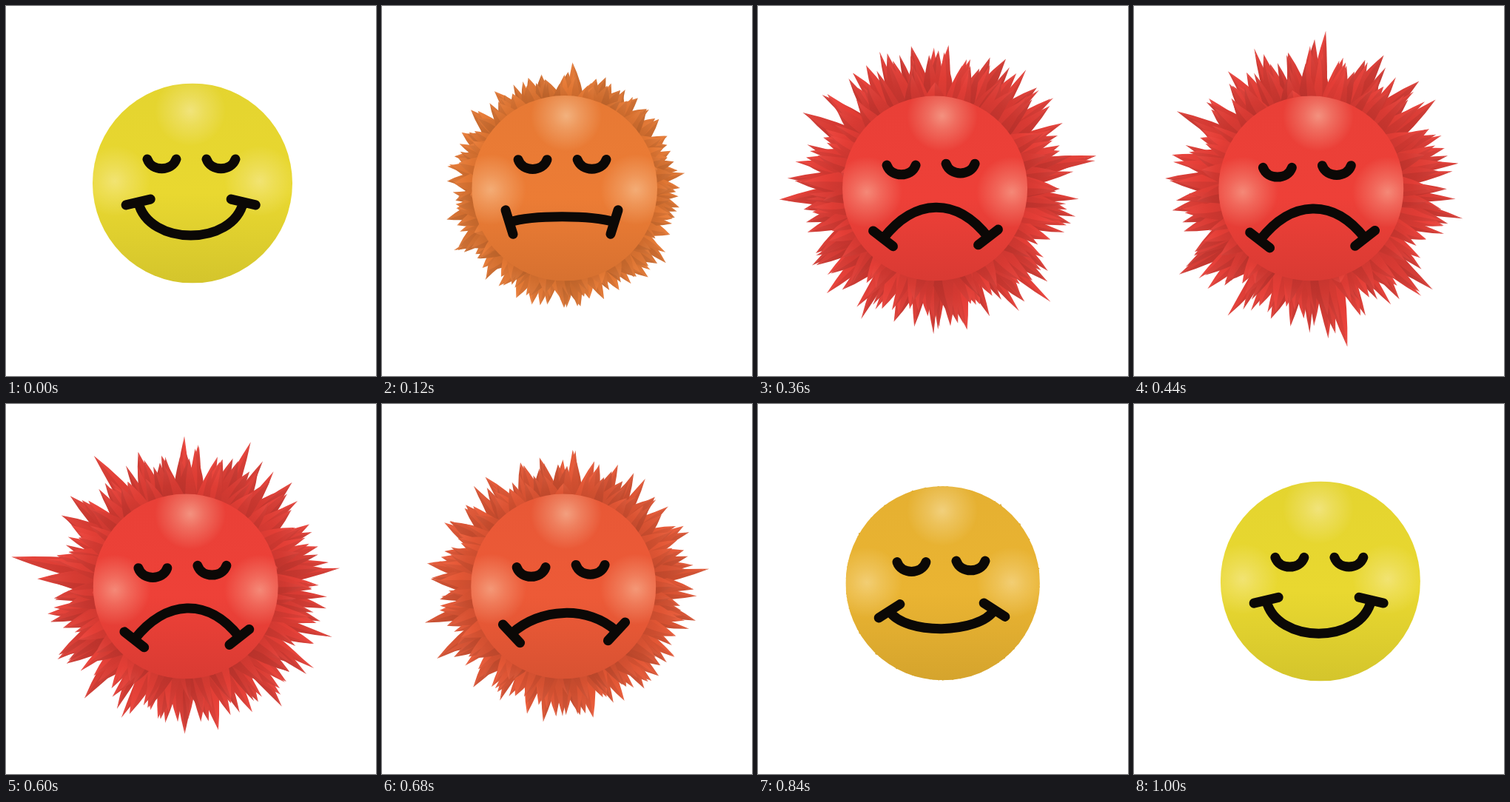
Recreate the animation shown at these times as an HTML page with a canvas. Size 500x500 px, loop 1.04 s.

```html
<!DOCTYPE html>
<html lang="en">
<head>
<meta charset="utf-8">
<title>Mood ball</title>
<style>
html, body { margin: 0; height: 100%; overflow: hidden; background: #fff; }
canvas { display: block; width: 100%; height: 100%; }
</style>
</head>
<body>
<canvas id="stage" width="500" height="500"></canvas>
<script>
const ctx = document.getElementById('stage').getContext('2d');
const LOOP = 1040, STEP = 40, TAU = Math.PI * 2;
const YELLOW = [233, 216, 48], RED = [238, 64, 56];

// The longest outbursts: direction, time of the peak, length
const FLARES = [
  [-1.76, 240, 105], [-.2, 340, 100], [1.27, 240, 90],
  [3.07, 340, 88], [3.31, 600, 115], [-1.57, 520, 84]
];

const lerp = (a, b, u) => a + (b - a) * u;
const clamp = u => Math.max(0, Math.min(1, u));
const smooth = (from, to, t) => {
  const u = clamp((t - from) / (to - from));
  return u * u * (3 - 2 * u);
};
const rnd = n => { const v = Math.sin(n * 12.9898) * 43758.5453; return v - Math.floor(v); };
const tint = (c, k, white = 0) =>
  `rgb(${c.map(v => Math.round(lerp(Math.min(255, v * k), 255, white))).join()})`;

// Everything follows from the mood (0 calm, 1 furious) and a slow sway of the head.
function poseAt(t) {
  const mood = smooth(0, 210, t) * (1 - smooth(580, 960, t));
  const sway = power => Math.sin(Math.PI * (t / LOOP) ** power) ** 2;
  const shrink = Math.min(1, mood * 1.6);
  return {
    t, mood,
    color: YELLOW.map((v, i) => lerp(v, RED[i], mood)),
    x: 252 - 13 * sway(.7),
    y: 239.5 + 7 * shrink,
    r: 135 - 10 * shrink,
    grow: Math.max(0, (mood - .2) / .8),
    eyeX: 250.5 - 17 * sway(.7),
    eyeY: 207 + 13 * sway(1.25),
    mouthX: 249.7 - 10 * sway(.55),
    mouthY: 265 + 44 * mood + 8 * sway(1.25),
    tilt: -1.7 * sway(1.25)
  };
}

// A cone in two facets, one lit and one in shade.
function spike({ angle, reach, width, shade, bend }, { x, y, r, color }) {
  const cos = Math.cos(angle), sin = Math.sin(angle), base = r * .9;
  const at = (d, side) => [x + cos * d - sin * side, y + sin * d + cos * side];
  const knee = lerp(base, reach, .55);
  const tip = at(reach, bend), root = at(base, 0);
  for (const side of [-1, 1]) {
    const k = shade + (cos * side < 0 ? .03 : -.04);
    const fill = ctx.createLinearGradient(...root, ...tip);
    fill.addColorStop(0, tint(color, k * .9));
    fill.addColorStop(.5, tint(color, k * .96));
    fill.addColorStop(1, tint(color, k, .05));
    ctx.fillStyle = fill;
    ctx.beginPath();
    ctx.moveTo(...at(base, side * width));
    ctx.quadraticCurveTo(...at(knee, side * width * .7 + bend * .3), ...tip);
    ctx.quadraticCurveTo(...at(knee, -side), ...root);
    ctx.fill();
  }
}

function drawSpikes(pose) {
  const { t, r, grow } = pose;
  if (!grow) return;
  const wave = (seed, turns) => .5 + .5 * Math.sin(TAU * (rnd(seed) + turns * t / LOOP));
  const list = FLARES.map(([angle, peak, length]) => ({
    angle, width: 17, shade: .94, bend: 0,
    reach: r + grow * length * Math.exp(-(((t - peak) / 130) ** 2))
  }));
  const count = 170;
  for (let i = 0; i < count; i++) {
    // Spikes leaning towards the viewer look shorter and lie in front.
    const lean = rnd(i + 600) ** 1.5 * .55;
    const length = 34 + 24 * rnd(i + 300) + 18 * wave(i + 9, 1) + 24 * wave(i + 50, 2) ** 6;
    list.push({
      angle: TAU * (i + 2 * rnd(i)) / count,
      reach: lerp(r - 3, (r + length) * Math.cos(lean), grow),
      width: 9 + 8 * rnd(i + 70),
      shade: .87 + .1 * rnd(i + 500),
      bend: 22 * (rnd(i + 40) - .5)
    });
  }
  for (const s of list.sort((a, b) => b.reach - a.reach)) spike(s, pose);
}

function glow(x, y, r, alpha) {
  const g = ctx.createRadialGradient(x, y, 0, x, y, r);
  g.addColorStop(0, `rgba(255,245,215,${alpha})`);
  g.addColorStop(.4, `rgba(255,245,215,${alpha * .55})`);
  g.addColorStop(1, 'rgba(255,245,215,0)');
  ctx.fillStyle = g;
  ctx.fillRect(x - r, y - r, 2 * r, 2 * r);
}

function drawBall({ x, y, r, color, mood }) {
  const skin = ctx.createLinearGradient(0, y - r, 0, y + r);
  skin.addColorStop(0, tint(color, .98));
  skin.addColorStop(.55, tint(color, 1));
  skin.addColorStop(1, tint(color, .91));
  ctx.save();
  ctx.beginPath();
  ctx.arc(x, y, r, 0, TAU);
  ctx.clip();
  ctx.fillStyle = skin;
  ctx.fillRect(x - r, y - r, 2 * r, 2 * r);
  const level = y + lerp(-3, 5, mood);
  glow(249, y - 98, 48, .45);
  glow(147, level, 48, .4);
  glow(343, level, 48, .4);
  ctx.restore();
}

function curve(x1, y1, x2, y2, inset, pull) {
  const dx = (x2 - x1) * inset;
  ctx.moveTo(x1, y1);
  ctx.bezierCurveTo(x1 + dx, y1 + pull, x2 - dx, y2 + pull, x2, y2);
}

function drawFace({ mood, eyeX, eyeY, mouthX, mouthY, tilt }) {
  ctx.strokeStyle = '#0b0806';
  ctx.lineWidth = 13;
  ctx.lineCap = 'round';
  ctx.beginPath();
  for (const side of [-1, 1]) {
    const x = eyeX + side * 40, y = eyeY + side * tilt;
    curve(x - 19.5, y, x + 19.5, y, .15, 17);
  }
  // The mouth flips from smile to frown; its end bars stay square to the curve.
  const half = 71, inset = lerp(.1, .3, mood), pull = lerp(60, -55, mood);
  curve(mouthX - half, mouthY - tilt, mouthX + half, mouthY + tilt, inset, pull);
  const across = Math.atan2(pull, 2 * half * inset) + Math.PI / 2;
  const dx = 17 * Math.cos(across), dy = 17 * Math.sin(across);
  for (const side of [-1, 1]) {
    const x = mouthX + side * half, y = mouthY + side * tilt;
    ctx.moveTo(x + side * dx, y - dy);
    ctx.lineTo(x - side * dx, y + dy);
  }
  ctx.stroke();
}

const start = performance.now();
function frame() {
  const t = Math.floor((performance.now() - start) % LOOP / STEP) * STEP;
  const pose = poseAt(t);
  ctx.fillStyle = '#fff';
  ctx.fillRect(0, 0, 500, 500);
  drawSpikes(pose);
  drawBall(pose);
  drawFace(pose);
  requestAnimationFrame(frame);
}
frame();
</script>
</body>
</html>
```
